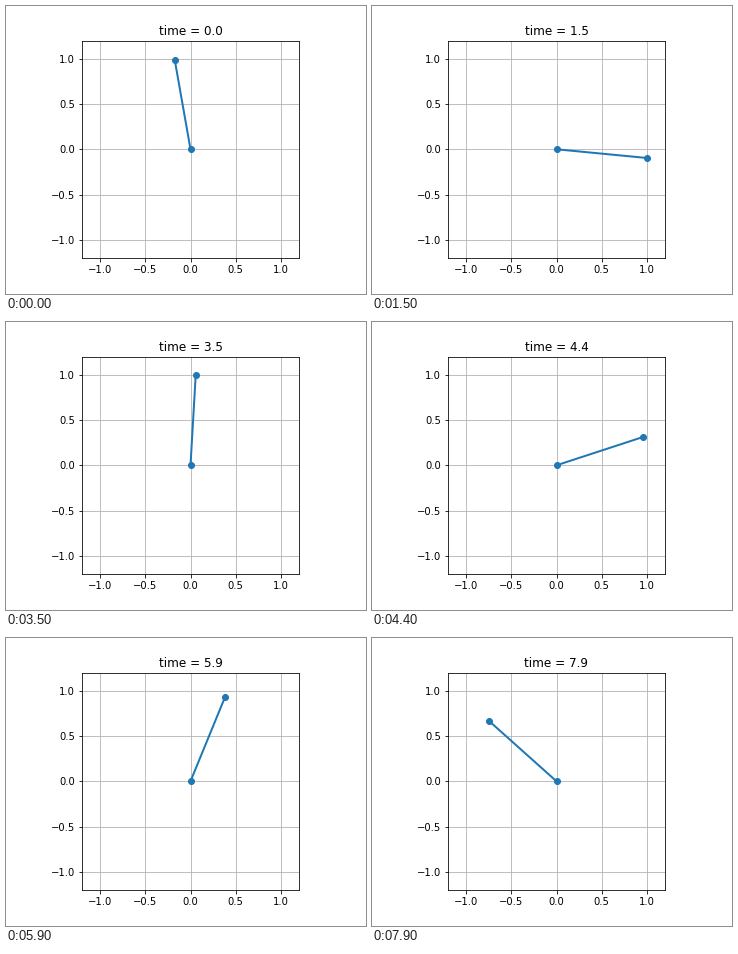
These frames come from a looping animation (360 px wide and 288 px high, 8000 ms). A matplotlib script:

```python
import numpy as np
import matplotlib.pyplot as plt
from matplotlib.animation import FuncAnimation

FRAMES, STEP = 80, 0.1
G = 9.8

# Known poses: time, angle counter-clockwise from upright in degrees
POSES = np.array([(0, 10), (1.5, 624.5), (2.5, 1155.2), (4.4, 2448.1),
                  (5.9, 3577.7), (7.1, 4483.3), (7.9, 5088.2)])


def mean_speed(t):
    """Constant drive torque that settles softly at a top speed (rad/s)."""
    top, gain, end, soft = 758, 105, 4.13, 0.3
    return np.radians(top - gain * soft * np.logaddexp(0, (end - t) / soft))


def sway(angle, t):
    """Lead of the uniform phase over the angle, caused by gravity."""
    c = G / mean_speed(t) ** 2
    c /= (1 + 0.75 * c * c) ** 2
    return (c / (1 + 0.75 * c * c) * np.sin(angle)
            + 0.375 * c * c * np.sin(2 * angle))


def swing():
    """Pendulum angle at every frame."""
    fine = np.linspace(0, FRAMES * STEP, 8001)
    v = mean_speed(fine)
    turned = np.concatenate(
        ([0], np.cumsum((v[1:] + v[:-1]) / 2 * np.diff(fine))))

    key_t, key_a = POSES[:, 0], np.radians(POSES[:, 1])
    offset = key_a + sway(key_a, key_t) - np.interp(key_t, fine, turned)

    t = np.arange(FRAMES) * STEP
    phase = np.interp(t, fine, turned) + np.interp(t, key_t, offset)
    angle = phase.copy()
    for _ in range(40):
        angle = phase - sway(angle, t)
    return angle


angles = swing()

fig, ax = plt.subplots(figsize=(5, 4), dpi=72)
fig.subplots_adjust(left=0.125, right=0.9, bottom=0.125, top=0.88)
ax.set_aspect("equal")
ax.set(xlim=(-1.2, 1.2), ylim=(-1.2, 1.2))
ticks = np.arange(-1, 1.1, 0.5)
ax.set_xticks(ticks)
ax.set_yticks(ticks)
ax.grid(True)
rod, = ax.plot([], [], "o-", lw=2)
title = ax.set_title("")


def draw(i):
    a = angles[i]
    rod.set_data([0, -np.sin(a)], [0, np.cos(a)])
    title.set_text(f"time = {i * STEP:.1f}")
    return rod, title


anim = FuncAnimation(fig, draw, frames=FRAMES, interval=100, repeat=True,
                     repeat_delay=0, blit=False)
plt.show()
```
